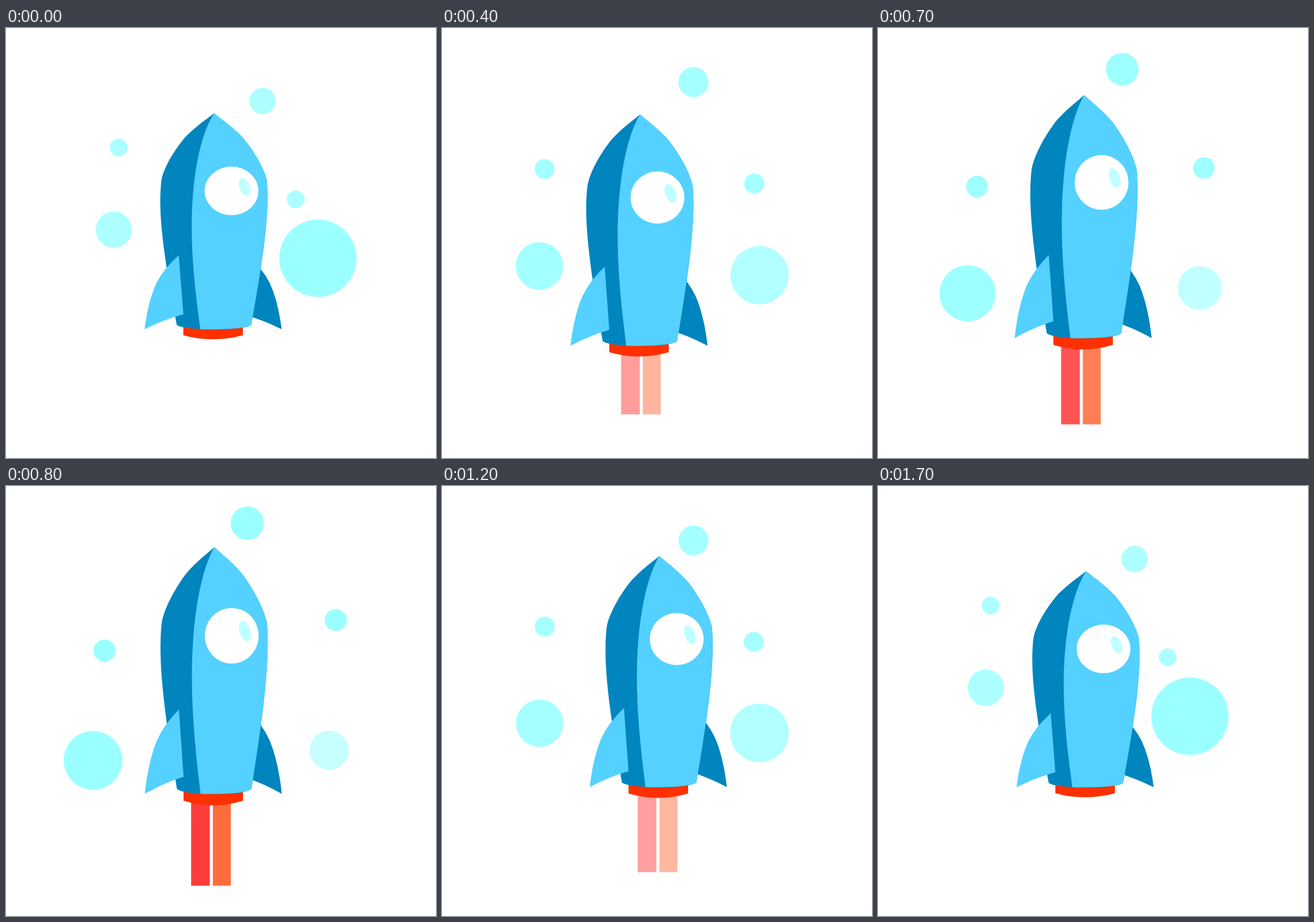
Write an HTML page that moves like this. It is 748 by 748 pixels and loops after 1800 ms.

```html
<!DOCTYPE html>
<html lang="en">
<head>
<meta charset="utf-8">
<title>Rocket</title>
<style>
  html, body { margin: 0; width: 100%; height: 100%; overflow: hidden; background: #fff; }
  svg { display: block; width: 100%; height: 100%; }
  .dark { fill: #0085be; }
  .light { fill: #54d1ff; }
</style>
</head>
<body>
<svg viewBox="0 0 748 748">
  <defs>
    <path id="fin" d="M300.5 395.5Q274 419 262 443Q247 475 241 524Q275 507 308.5 498Z"/>
  </defs>
  <g id="bubbles"></g>
  <g id="flames">
    <rect id="flameL" width="32.5" fill="#f00"/>
    <rect id="flameR" width="31.2" fill="#ff3f00"/>
  </g>
  <g id="rocket">
    <use href="#fin" class="dark" transform="translate(720.5 0) scale(-1 1)"/>
    <path fill="#ff3000" d="M308.5 517V534.5Q360 548.5 412 534.5V517Z"/>
    <path class="dark" d="M362 148.5C378 161 400 177 413 192C432 215 449 244 453.5 264C459 322 447 405 426.5 516.5C415 527 310 527 297 516.5C276 405 263 322 270.5 264C274 244 291 215 310 192C323 177 345 161 362 148.5Z"/>
    <path class="light" d="M362 148.5C378 161 400 177 413 192C432 215 449 244 453.5 264C459 322 447 405 426.5 516.5C419 523 378 524.8 338 524C330 465 323 405 323 345C323 260 338 185 362 148.5Z"/>
    <use href="#fin" class="light"/>
    <ellipse cx="392.3" cy="283.3" rx="46.8" ry="42.3" fill="#fff"/>
    <ellipse cx="415" cy="276.3" rx="8.9" ry="16" fill="#bfffff" transform="rotate(-22 415 276.3)"/>
  </g>
</svg>
<script>
const LOOP = 1800, STEP = 100, SPAN = 17;
const TIP_X = 362, TIP_Y = 148.5;
const $ = id => document.getElementById(id);
const set = (el, attrs) => { for (const k in attrs) el.setAttribute(k, attrs[k]); };
const mix = (a, b, u) => a + (b - a) * u;

// Thrust builds evenly, then drops quickly and tails off: [step, thrust].
const thrustKeys = [[0, 0], [8, 8 / 7], [10, 0.94], [12, 0.56], [SPAN, 0]];
function thrustAt(t) {
  const i = Math.max(1, thrustKeys.findIndex(k => k[0] >= t));
  const [t0, a] = thrustKeys[i - 1], [t1, b] = thrustKeys[i];
  return mix(a, b, (t - t0) / (t1 - t0));
}

// Closed flight path: step, tip x, tip y, flame x.
const flight = [
  [0, 362, 148.5, 352],
  [4, 344.5, 150.5, 346],
  [7, 358.6, 117, 353],
  [10, 369.3, 93.5, 365],
  [12, 378, 122, 375],
  [15, 382.3, 148, 373]
];

// Smooth curve through one column of the flight path.
function fly(col, t) {
  const n = flight.length;
  const at = i => flight[(i + n) % n][0] + SPAN * Math.floor(i / n);
  const val = i => flight[(i + n) % n][col];
  const slope = i => (val(i + 1) - val(i - 1)) / (at(i + 1) - at(i - 1));
  t %= SPAN;
  let i = n - 1;
  while (at(i) > t) i--;
  const h = at(i + 1) - at(i), u = (t - at(i)) / h, w = 1 - u;
  return w * w * (1 + 2 * u) * val(i) + u * u * (3 - 2 * u) * val(i + 1)
    + h * u * w * (w * slope(i) - u * slope(i + 1));
}

// Circles go from one x, y, r to another; the small ones swing out in an arc.
const BOW = 0.059;
const bubbles = [
  { from: [446.3, 127, 23], to: [425, 71.7, 28.4], bow: BOW },
  { from: [196, 208, 15.4], to: [172.3, 275.8, 18.9], bow: BOW },
  { from: [503.9, 298, 15.4], to: [566.8, 243.5, 18.8], bow: BOW },
  { from: [187.7, 350.8, 31.6], to: [156, 461.5, 48.7], bow: 0 },
  { from: [542.6, 400.6, 67.3], to: [559.8, 452.2, 38.3], bow: 0 }
];
for (const b of bubbles) {
  b.el = document.createElementNS("http://www.w3.org/2000/svg", "circle");
  $("bubbles").append(b.el);
}

function drawBubble({ el, from, to, bow }, u) {
  const [x, y, r] = from.map((v, i) => mix(v, to[i], u));
  const side = 4 * u * (1 - u) * bow;
  const red = Math.round(to[2] > from[2] ? mix(173, 158, u) : mix(156, 194, u));
  set(el, {
    cx: x - side * (to[1] - from[1]),
    cy: y + side * (to[0] - from[0]),
    r, fill: `rgb(${red},255,255)`
  });
}

function draw(ms) {
  const t = Math.min(SPAN, Math.floor((ms % LOOP) / STEP));
  const thrust = thrustAt(t);
  for (const b of bubbles) drawBubble(b, thrust);

  const x = fly(1, t), y = fly(2, t), grow = 1 + thrust / 8;
  set($("rocket"), { transform: `translate(${x - TIP_X} ${y}) scale(1 ${grow}) translate(0 ${-TIP_Y})` });

  const fx = fly(3, t), top = y + 378 * grow;
  const height = mix(649, 689.5, thrust) - top;
  set($("flameL"), { x: fx - 34.5, y: top, height });
  set($("flameR"), { x: fx + 3.3, y: top, height });
  set($("flames"), { opacity: thrust * 2 / 3 });
}

const start = performance.now();
function tick() {
  draw(performance.now() - start);
  requestAnimationFrame(tick);
}
tick();
</script>
</body>
</html>
```
